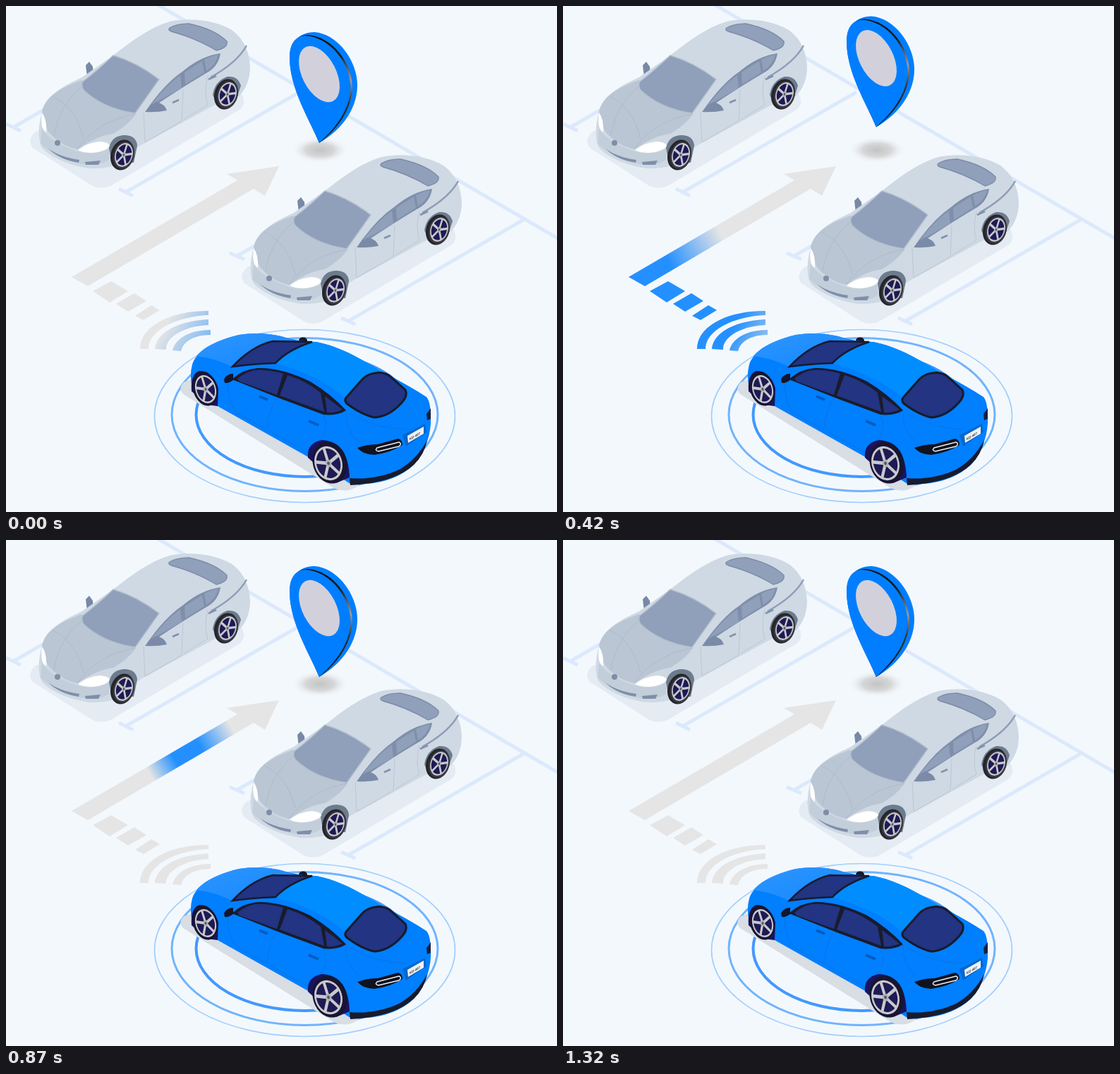
These frames come from a looping animation (781 px wide and 717 px high, 1390 ms). An HTML page:

```html
<!DOCTYPE html>
<html lang="en">
<head>
<meta charset="utf-8">
<title>Parking guidance</title>
<style>
  html, body { margin: 0; width: 100%; height: 100%; overflow: hidden; background: #f3f8fd; }
  svg { display: block; width: 100vw; height: 100vh; }
</style>
</head>
<body>
<svg viewBox="0 0 781 717">
  <defs>
    <linearGradient id="signalFill" gradientUnits="userSpaceOnUse" x1="419" y1="565" x2="-11" y2="315"/>
    <linearGradient id="shaftFill" gradientUnits="userSpaceOnUse" x1="-68" y1="491" x2="537" y2="138"/>
    <radialGradient id="pinShade">
      <stop offset="0" stop-color="#c3c3c3"/>
      <stop offset=".5" stop-color="#d6d7d8"/>
      <stop offset="1" stop-color="#f3f8fd" stop-opacity="0"/>
    </radialGradient>
    <linearGradient id="pinEdge" x1="0" y1="0" x2="0" y2="1">
      <stop offset="0" stop-color="#0a0a0a"/>
      <stop offset=".2" stop-color="#222"/>
      <stop offset=".42" stop-color="#a09c9c"/>
      <stop offset=".62" stop-color="#333"/>
      <stop offset="1" stop-color="#080808"/>
    </linearGradient>
    <linearGradient id="bonnet" x1="0" y1="0" x2="1" y2="1">
      <stop offset="0" stop-color="#2d96ff"/>
      <stop offset="1" stop-color="#1487ff"/>
    </linearGradient>
    <g id="rim">
      <circle r="10.5" fill="#1d1a55"/>
      <path d="M0 0V-10M0 0L9.5-3.1M0 0L5.9 8.1M0 0L-5.9 8.1M0 0L-9.5-3.1" stroke="#c9c9cc" stroke-width="2.1"/>
      <circle r="9.8" fill="none" stroke="#c9c9cc" stroke-width="1.4"/>
      <circle r="2.3" fill="#b1b1b4"/>
      <circle r="1" fill="#55555c"/>
    </g>
    <g id="greyWheel">
      <ellipse rx="16.5" ry="22" fill="#25252b" transform="rotate(17)"/>
      <ellipse cx="2" rx="14.5" ry="19.5" fill="#3a3a40" transform="rotate(17)"/>
      <use href="#rim" transform="translate(2 0) rotate(17) scale(1.18 1.65)"/>
    </g>
    <g id="greyCar">
      <path d="M42 178Q29 190 38 201L116 251Q132 263 150 254L331 147Q341 139 335 126L300 100Z" fill="#e4ebf2"/>
      <path d="M113 84L118 79L123 86L124 99L115 101Z" fill="#7889a6"/>
      <path d="M51 150C55 132 70 118 108 101L152 70C180 48 205 30 232 22C262 16 296 20 320 34C338 47 345 66 346 86C346 104 340 118 330 128L296 140L188 199L160 224Q142 231 118 230C88 226 62 213 52 202C45 192 45 172 51 150Z" fill="#cfd9e4"/>
      <path d="M51 150C55 132 70 118 108 105Q118 132 184 153C178 162 168 172 152 181Q128 184 102 203Q78 199 60 178Q54 165 51 150Z" fill="#bac6d4"/>
      <path d="M51 174Q62 192 101 206Q125 213 147 202L146 218Q132 228 108 224Q72 217 49 195Z" fill="#c3cedb"/>
      <path d="M66 128Q98 142 110 188M108 114Q75 140 68 184M184 153Q130 162 101 203" fill="none" stroke="#aebbcb" stroke-width="1"/>
      <path d="M109 107Q130 91 152 70Q186 80 217 104L183 152Q137 145 110 119Q106 112 109 107Z" fill="#909fba" stroke="#b2bfce" stroke-width="1.5"/>
      <path d="M232 31Q242 25 259 25Q296 33 313 50Q315 59 298 63Q270 46 234 36Q229 34 232 31Z" fill="#909fba" stroke="#7c8ca8" stroke-width="1.3"/>
      <path d="M200 146Q225 110 250 93Q276 71 304 67Q301 86 284 95Q250 115 204 146Z" fill="#7f8faa"/>
      <path d="M206 140Q226 113 247 98L249 116Q229 128 206 140Z" fill="#909fba"/>
      <path d="M253 94L278 78L281 94L254 111Z" fill="#909fba"/>
      <path d="M281 76Q290 71 301 69Q298 83 284 92Z" fill="#909fba"/>
      <path d="M341 56Q328 80 290 101" fill="none" stroke="#8e9db6" stroke-width="2.5"/>
      <path d="M195 151L197 193L249 163L251 118M252 161L286 140Q280 121 286 99" fill="none" stroke="#bbc7d5" stroke-width="1"/>
      <path d="M236 137L245 133M287 104L298 99" stroke="#8292ad" stroke-width="2.7"/>
      <path d="M197 150Q205 139 214 136Q225 139 228 148Q214 151 197 150Z" fill="#7a8aa7"/>
      <path d="M146 201Q150 183 169 183Q185 184 186 198L181 222L150 222Z" fill="#6d7b8e"/>
      <path d="M293 126Q296 106 314 100Q329 99 333 113L326 134L298 137Z" fill="#6d7b8e"/>
      <use href="#greyWheel" x="165" y="211"/>
      <use href="#greyWheel" x="312" y="125"/>
      <path d="M102 204Q117 193 133 192Q146 193 147 198Q142 206 122 208Q109 208 102 204Z" fill="#fff"/>
      <path d="M51 151Q58 160 57 179Q48 174 51 151Z" fill="#fff"/>
      <path d="M60 202Q76 214 104 218L103 222Q76 218 60 202Z" fill="#7f8fa9"/>
      <path d="M112 221L134 219L131 225L113 225Z" fill="#7f8fa9"/>
      <circle cx="73" cy="194" r="4" fill="#7f8ea6"/>
    </g>
    <g id="signal">
      <path d="M123 404L149 390L173 404L147 420ZM156 422L182 407L199 418L173 433ZM183 439L206 424L218 431L195 445Z"/>
      <path d="M190 486C190 455 230 432 287 432V438C240 440 202 460 202 486Z"/>
      <path d="M211 486C213 462 245 446 287 444V452C255 453 226 468 227 487Z"/>
      <path d="M236 488C240 470 262 459 290 459V466C270 466 252 473 248 489Z"/>
    </g>
    <path id="shaft" d="M93 384L328 247L313 238L387 227L367 269L351 259L116 397Z"/>
  </defs>

  <rect width="781" height="717" fill="#f3f8fd"/>

  <path d="M213-3L785 331M0 167L21 177M12 171L200 62M160 259L180 269M171 263L416 122M317 350L338 359M328 354L420 301M475 442L495 451M486 446L735 302" fill="none" stroke="#dce9fc" stroke-width="5"/>

  <use href="#greyCar"/>

  <g fill="#e5e5e5"><use href="#shaft"/><use href="#signal"/></g>
  <use href="#shaft" fill="url(#shaftFill)"/>
  <use href="#signal" fill="url(#signalFill)"/>

  <ellipse cx="445" cy="204" rx="41" ry="19" fill="url(#pinShade)"/>
  <g id="pin">
    <path d="M444 194C432 164 402 118 402 73C402 52 416 37 437 37C470 39 498 78 498 112C498 151 469 180 444 194Z" fill="#007eff"/>
    <path d="M444 194C432 164 404 118 404 73C404 52 412 41 428 41C464 44 491 82 491 115C490 149 467 177 444 194Z" fill="url(#pinEdge)"/>
    <path d="M444 194C432 164 402 118 402 73C402 53 410 43 424 42C460 44 488 82 488.500 115C488 148 465 175 444 194Z" fill="#007eff"/>
    <ellipse cx="444" cy="96.500" rx="24" ry="43" fill="#d2d1db" transform="rotate(-27 444 96.500)"/>
  </g>

  <use href="#greyCar" x="300" y="192"/>

  <g fill="none">
    <ellipse cx="423.5" cy="581" rx="213" ry="122.5" stroke="#a3cffd" stroke-width="1.7"/>
    <ellipse cx="423.5" cy="579" rx="188.5" ry="108.5" stroke="#70b4fd" stroke-width="3"/>
    <ellipse cx="423.5" cy="579" rx="154" ry="88" stroke="#4299fd" stroke-width="4"/>
  </g>

  <g id="blueCar">
    <path d="M252 533Q241 545 256 553L463 682Q480 691 496 682L520 660L290 520Z" fill="#d9dde4"/>
    <ellipse cx="421" cy="474" rx="6" ry="4.5" fill="#15172b"/>
    <path d="M264 508C270 488 300 473 330 466Q360 461 390 468Q410 475 440 476C476 483 506 502 536 520Q570 537 596 554Q603 562 602 592Q600 622 580 648C562 667 530 680 488 677L430 640L300 567L266 548Q259 526 264 508Z" fill="#007fff"/>
    <path d="M270 496C282 481 306 472 330 466Q360 461 390 468L409 474Q352 474 320 511Q296 499 270 496Z" fill="url(#bonnet)"/>
    <path d="M382 506C397 489 418 478 440 476C476 483 506 502 536 520Q510 522 481 556Q448 525 382 506Z" fill="#008dff"/>
    <path d="M321 511C337 494 356 480 378 475L434 476C412 483 395 492 382 506Q350 507 321 511Z" fill="#223482" stroke="#171a2f" stroke-width="2.5"/>
    <path d="M320 529Q337 514 357 513Q390 512 431 532Q461 550 482 573Q470 581 450 579L388 556Z" fill="#191b2c"/>
    <path d="M328 528Q343 516 358 515.500Q377 516 393 521L384 551L331 532Z" fill="#223482"/>
    <path d="M399 523Q425 531 446 548L451 575L388 552Z" fill="#223482"/>
    <path d="M452 553Q465 562 477 572Q466 577 455 576Z" fill="#223482"/>
    <path d="M482 555L505 529Q513 521 524 520Q537 518 546 526L566 544Q570 552 561 562Q543 582 522 583Q504 579 484 564Q479 560 482 555Z" fill="#223482" stroke="#181a2b" stroke-width="3"/>
    <path d="M309 529Q313 521 322 521L322 530Q316 535 310 534Z" fill="#14162a"/>
    <path d="M314 534Q314 560 327 577L370 600Q372 575 383 556M373 602L428 633M450 580Q460 601 443 617M489 578Q520 598 568 600M482 574Q480 600 500 618" fill="none" stroke="#0774e4" stroke-width="1"/>
    <path d="M359 553L371 558M429 588L443 594" stroke="#075cc1" stroke-width="4"/>
    <path d="M487 669Q525 672 557 657Q582 643 597 615Q593 636 578 650Q550 676 488 679Z" fill="#171b2c"/>
    <path d="M498 626Q512 621 527 621L556 613Q562 615 562 622Q545 633 522 636Q507 636 498 626Z" fill="#10121e"/>
    <path d="M526 626L557 618Q562 620 557 624L528 631Q522 630 526 626Z" fill="none" stroke="#eceff4" stroke-width="1.4"/>
    <path d="M602 570L596 578L597 587L602 585Z" fill="#14203f"/>
    <path d="M562 608L594 592L596 604L567 624Z" fill="#0667cd"/>
    <path d="M569 609L592 596L592 606L570 619Z" fill="#eef1f5"/>
    <text transform="matrix(.88 -.5 0 1 572 615.500)" font-family="Liberation Sans, sans-serif" font-weight="700" font-size="5" fill="#333">KD 407</text>
    <path d="M263 546Q261 522 274 517Q295 519 301 542L300 567L285 565Z" fill="#19145f"/>
    <path d="M428 640Q426 619 448 615Q485 617 487 668L468 676Z" fill="#19145f"/>
    <ellipse cx="282" cy="542" rx="17" ry="25" fill="#17152f" transform="rotate(-17 282 542)"/>
    <use href="#rim" transform="translate(283 543) rotate(-17) scale(1.38 1.95)"/>
    <ellipse cx="459" cy="647" rx="24" ry="30" fill="#17152f" transform="rotate(-17 459 647)"/>
    <use href="#rim" transform="translate(457 648) rotate(-17) scale(1.85 2.35)"/>
  </g>
</svg>
<script>
  const LOOP = 1390, STEP = 30;
  const $ = id => document.getElementById(id);

  // time, then distances along the path: tail end, tail top, front top, front end
  const signalSteps = [
    [0, -150, -150, -50, 75],
    [330, -90, 0, 215, 335],
    [540, 50, 140, 350, 350],
    [690, 140, 215, 350, 350],
    [870, 215, 250, 350, 350]
  ];
  // time, five distances along the arrow, opacity of the first two stops
  const shaftSteps = [
    [0, -200, -200, -200, -200, -121, 1, 1],
    [330, 0, 0, 0, 18, 135, 1, 1],
    [540, 0, 40, 80, 98, 139, 1, 1],
    [690, 0, 65, 125, 150, 181, .85, .3],
    [870, 0, 115, 156, 196, 248, 0, 0],
    [1110, 0, 203, 247, 278, 328, 0, 0],
    [1320, 0, 330, 360, 400, 420, 0, 0]
  ];

  function sample(steps, t) {
    const i = steps.findIndex(s => s[0] > t);
    if (i < 0) return steps[steps.length - 1].slice(1);
    const a = steps[i - 1], b = steps[i];
    const k = (t - a[0]) / (b[0] - a[0]);
    return a.slice(1).map((v, j) => v + (b[j + 1] - v) * k);
  }

  function makeStops(id, count) {
    return Array.from({ length: count }, () => {
      const stop = document.createElementNS("http://www.w3.org/2000/svg", "stop");
      stop.setAttribute("stop-color", "#2490ff");
      return $(id).appendChild(stop);
    });
  }

  function setStops(stops, offsets, alphas) {
    stops.forEach((stop, i) => {
      stop.setAttribute("offset", Math.min(1, Math.max(0, offsets[i])));
      stop.setAttribute("stop-opacity", alphas[i]);
    });
  }

  const signalStops = makeStops("signalFill", 4);
  const shaftStops = makeStops("shaftFill", 5);

  function draw(now) {
    const t = Math.min(1320, Math.floor((now % LOOP) / STEP) * STEP);
    const lift = Math.max(0, 24 * (1 - Math.abs(t - 445) / 425));
    $("pin").setAttribute("transform", `translate(0 ${-lift})`);

    const signal = sample(signalSteps, t);
    setStops(signalStops, signal.map(s => (s + 150) / 500), [0, 1, 1, 0]);

    const shaft = sample(shaftSteps, t);
    setStops(shaftStops, shaft.slice(0, 5).map(s => (s + 200) / 700), [shaft[5], shaft[6], 1, 1, 0]);
  }

  const start = performance.now();
  function tick() {
    draw(performance.now() - start);
    requestAnimationFrame(tick);
  }
  tick();
</script>
</body>
</html>
```
